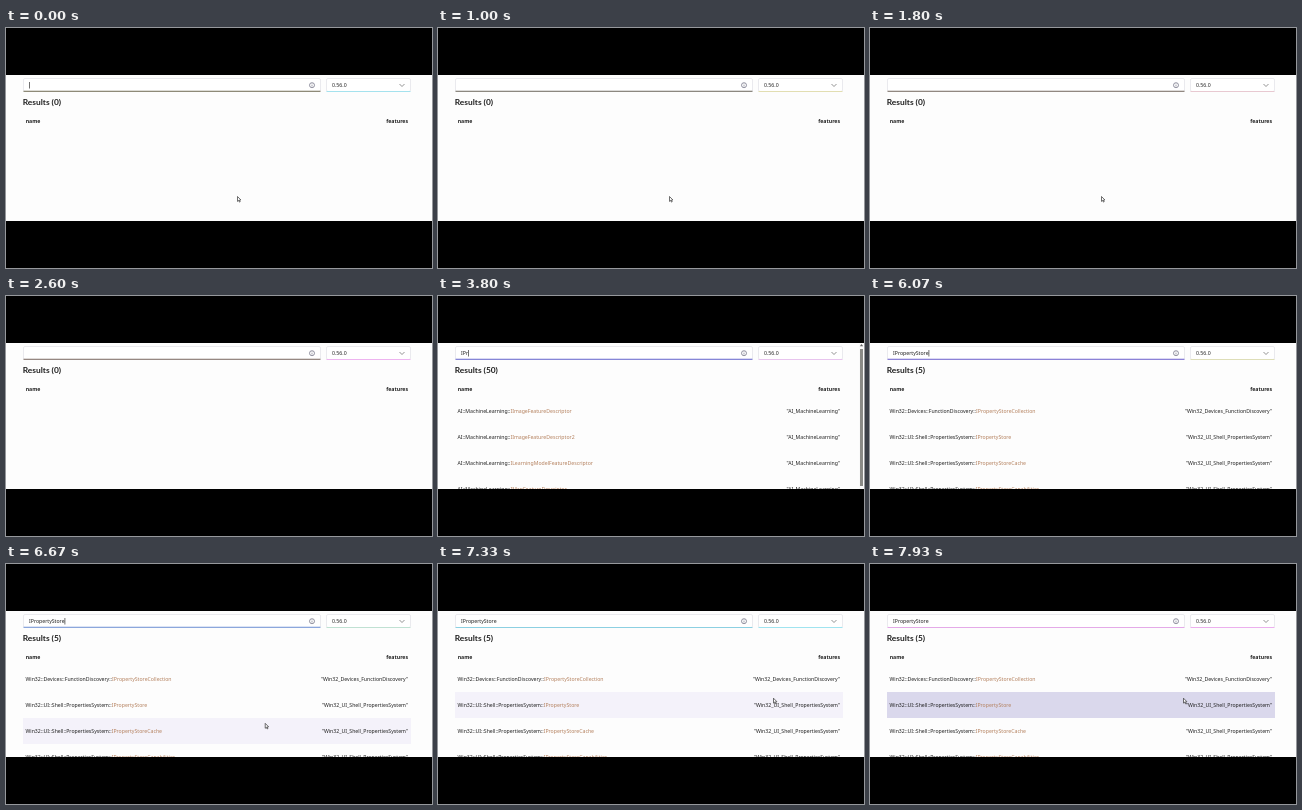
Recreate the animation shown at these times as an HTML page with a canvas. Size 426 px wide and 240 px high, loop 8 s.

```html
<!DOCTYPE html>
<html lang="en">
<head>
<meta charset="utf-8">
<title>Feature search</title>
<style>
html, body { margin: 0; width: 100%; height: 100%; overflow: hidden; background: #000; }
canvas { display: block; width: 426px; height: 240px; }
</style>
</head>
<body>
<canvas id="stage"></canvas>
<script>
const W = 426, H = 240, LOOP = 8000;
const TOP = 47, BOTTOM = 193, ROW_TOP = 102, ROW_H = 26;
const BODY = '"Noto Sans", "Open Sans", sans-serif';
const HEADING = 'Lato, "Noto Sans", sans-serif';
const QUERY = 'IPropertyStore';
const FIRST_RESULTS = 2800, FINAL_RESULTS = 5230, BLUR = 6900;
const BLINK = 530;

const canvas = document.getElementById('stage');
const ctx = canvas.getContext('2d');
const dpr = window.devicePixelRatio || 1;
canvas.width = W * dpr;
canvas.height = H * dpr;

// The first three keys are slow, the rest are even.
const keyTime = i => i < 3 ? [2750, 3250, 3650][i] : 3850 + (i - 3) * 170;
const LAST_KEY = keyTime(QUERY.length - 1);

const ML = 'AI::MachineLearning::';
const PS = 'Win32::UI::Shell::PropertiesSystem::';
const PS_FEATURE = 'Win32_UI_Shell_PropertiesSystem';
const broadRows = [
  'IImageFeatureDescriptor', 'IImageFeatureDescriptor2',
  'ILearningModelFeatureDescriptor', 'IMapFeatureDescriptor'
].map(type => [ML, type, 'AI_MachineLearning']);
const finalRows = [
  ['Win32::Devices::FunctionDiscovery::', 'IPropertyStoreCollection', 'Win32_Devices_FunctionDiscovery'],
  [PS, 'IPropertyStore', PS_FEATURE],
  [PS, 'IPropertyStoreCache', PS_FEATURE],
  [PS, 'IPropertyStoreCapabilities', PS_FEATURE]
];

// time, input underline, select underline
const tints = [
  [0, [142, 138, 120], [165, 226, 238]],
  [1000, [140, 136, 128], [226, 222, 178]],
  [2600, [150, 136, 130], [238, 180, 240]],
  [3800, [134, 134, 215], [232, 196, 238]],
  [6070, [140, 130, 215], [222, 222, 184]],
  [7330, [140, 208, 226], [160, 228, 240]],
  [7930, [228, 170, 232], [236, 176, 238]]
];

const clamp = v => Math.max(0, Math.min(1, v));
const progress = (t, a, b) => clamp((t - a) / (b - a));
const ease = p => p * p * (3 - 2 * p);
const mix = (a, b, p) => a + (b - a) * p;
const mixColor = (a, b, p) => `rgb(${a.map((v, i) => Math.round(mix(v, b[i], p)))})`;

function tint(t, which) {
  let i = 0;
  while (i < tints.length - 2 && t >= tints[i + 1][0]) i++;
  const a = tints[i], b = tints[i + 1];
  return mixColor(a[which], b[which], progress(t, a[0], b[0]));
}

function rect(x, y, w, h, color) {
  ctx.fillStyle = color;
  ctx.fillRect(x, y, w, h);
}

function text(str, x, y, { size = 5.18, weight = 400, color = '#202020', align = 'left', font = BODY } = {}) {
  ctx.font = `${weight} ${size}px ${font}`;
  ctx.textAlign = align;
  ctx.fillStyle = color;
  ctx.fillText(str, x, y);
  return ctx.measureText(str).width;
}

function line(points, color, width) {
  ctx.beginPath();
  points.forEach(([x, y]) => ctx.lineTo(x, y));
  ctx.strokeStyle = color;
  ctx.lineWidth = width;
  ctx.stroke();
}

function field(x, w, underline, thick) {
  ctx.beginPath();
  ctx.roundRect(x + 0.5, 50.5, w - 1, 13, 1.5);
  ctx.fillStyle = '#fff';
  ctx.fill();
  ctx.strokeStyle = '#e8e8ec';
  ctx.lineWidth = 0.9;
  ctx.stroke();
  rect(x + 0.5, 64 - thick, w - 1, thick, underline);
}

function infoIcon() {
  const color = '#68687c';
  ctx.beginPath();
  ctx.arc(306, 57.2, 2.5, 0, Math.PI * 2);
  ctx.strokeStyle = color;
  ctx.lineWidth = 0.7;
  ctx.stroke();
  rect(305.7, 56.8, 0.6, 1.8, color);
  rect(305.7, 55.6, 0.6, 0.6, color);
}

function caretVisible(t) {
  if (t >= BLUR) return false;
  if (t < keyTime(0)) return (t + 55) % (2 * BLINK) < BLINK;
  if (t < LAST_KEY) return true;
  return (t - LAST_KEY) % (2 * BLINK) < BLINK;
}

function pointerAt(t) {
  if (t < 2500) return [231.5, 168.5];
  if (t < 6400) return null;
  const go = ease(progress(t, 6400, 7200));
  const back = ease(progress(t, 7400, 7900));
  return [mix(231.5, 335.5, go) - 22 * back, mix(168.5, 134.2, go)];
}

function drawPointer([x, y]) {
  const shape = [[0, 0], [0, 4.9], [1.1, 3.9], [1.9, 5.6], [2.7, 5.2], [1.9, 3.6], [3.4, 3.5]];
  ctx.beginPath();
  shape.forEach(([dx, dy]) => ctx.lineTo(x + dx, y + dy));
  ctx.closePath();
  ctx.fillStyle = '#fff';
  ctx.fill();
  ctx.strokeStyle = '#333';
  ctx.lineWidth = 0.7;
  ctx.stroke();
}

function drawSearch(t) {
  field(17, 298, tint(t, 1), t < BLUR ? 1.3 : 1);
  field(320, 85, tint(t, 2), 1);
  infoIcon();
  text('0.56.0', 326, 59);
  line([[393.5, 56], [396, 58.5], [398.5, 56]], '#666', 0.7);

  let typed = 0;
  while (typed < QUERY.length && t >= keyTime(typed)) typed++;
  const width = text(QUERY.slice(0, typed), 23, 59);
  if (caretVisible(t)) rect(23 + width, 54, 0.7, 6.5, '#333');
}

function drawRows(t, pointer) {
  if (t < FIRST_RESULTS) return;
  const rows = t < FINAL_RESULTS ? broadRows : finalRows;
  if (pointer) {
    const hover = Math.floor((pointer[1] - ROW_TOP) / ROW_H);
    const shade = mixColor([244, 242, 250], [218, 216, 236], progress(t, 7500, 7800));
    rect(17, ROW_TOP + hover * ROW_H, 388, ROW_H, shade);
  }
  rows.forEach(([path, type, feature], i) => {
    const y = 116.7 + i * ROW_H;
    const width = text(path, 19.5, y);
    text(type, 19.5 + width, y, { color: '#b4805e' });
    text(`"${feature}"`, 402, y, { align: 'right' });
  });
}

function drawScrollbar() {
  rect(421, TOP, 5, BOTTOM - TOP, '#fafafa');
  rect(422, 53, 3, 137, '#8a8a86');
  ctx.beginPath();
  [[421.8, 50.2], [423.5, 48], [425.2, 50.2]].forEach(p => ctx.lineTo(...p));
  ctx.fillStyle = '#666';
  ctx.fill();
}

function draw(t) {
  ctx.setTransform(dpr, 0, 0, dpr, 0, 0);
  rect(0, 0, W, H, '#000');
  ctx.save();
  ctx.beginPath();
  ctx.rect(0, TOP, W, BOTTOM - TOP);
  ctx.clip();
  rect(0, TOP, W, BOTTOM - TOP, '#fdfdfd');

  const pointer = pointerAt(t);
  const count = t < FIRST_RESULTS ? 0 : t < FINAL_RESULTS ? 50 : 5;
  drawSearch(t);
  text(`Results (${count})`, 16.7, 77, { size: 8.4, weight: 700, font: HEADING });
  text('name', 19.7, 95, { weight: 600 });
  text('features', 402, 95, { weight: 600, align: 'right' });
  drawRows(t, pointer);
  if (count === 50) drawScrollbar();
  if (pointer) drawPointer(pointer);
  ctx.restore();
}

const start = performance.now();
function tick() {
  draw((performance.now() - start) % LOOP);
  requestAnimationFrame(tick);
}
tick();
</script>
</body>
</html>
```
